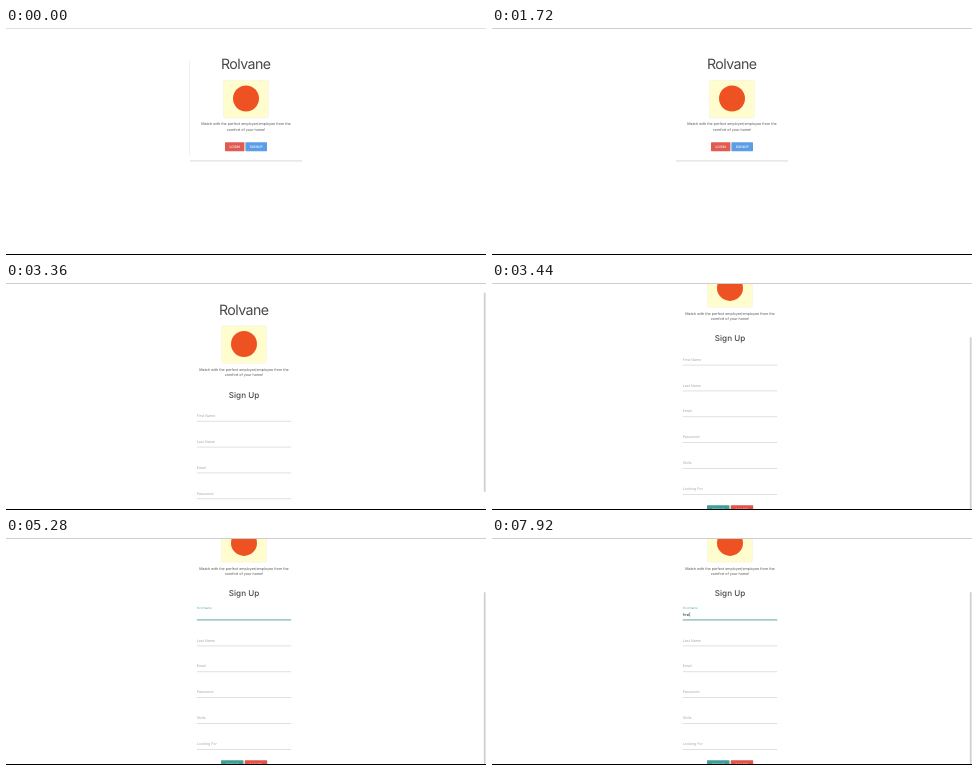
An HTML page that plays this animation: 480 by 227 pixels, repeating every 8000 ms.

```html
<!DOCTYPE html>
<html lang="en">
<head>
<meta charset="utf-8">
<title>Sign up</title>
<style>
  html, body { margin: 0; width: 100%; height: 100%; overflow: hidden; background: #fff; }
  svg { display: block; width: 480px; height: 227px; }
  text { font-family: Inter, sans-serif; font-size: 3.65px; fill: #555; text-rendering: geometricPrecision; }
  .mid { text-anchor: middle; }
  .title { font-size: 14.2px; letter-spacing: -.55px; fill: #484848; }
  .head { font-size: 8.1px; font-weight: 500; fill: #484848; }
  .label { font-size: 3.6px; fill: #a8a8a8; }
  .btn { font-size: 3.4px; font-weight: 500; fill: #fff; }
</style>
</head>
<body>
<svg id="stage" viewBox="0 0 480 227">
  <defs>
    <g id="intro">
      <text class="title mid" x="239.8" y="41">Rolvane</text>
      <rect x="217.4" y="52.3" width="45" height="37.5" rx="1.5" fill="#fffdce" stroke="#eeeee2" stroke-width=".5"/>
      <circle cx="240" cy="70.5" r="13" fill="#ee5122"/>
      <text class="mid" x="240" y="97.3">Match with the perfect employer/employee from the</text>
      <text class="mid" x="240" y="102.6">comfort of your home!</text>
    </g>
  </defs>
  <g id="home">
    <use href="#intro"/>
    <rect id="edge" x="183.2" y="32" width=".6" height="96" fill="#e6e6e6"/>
    <rect x="184" y="132.6" width="112" height=".7" fill="#c8c8c8"/>
  </g>
  <g id="form">
    <use href="#intro" x="-2"/>
    <text class="head mid" x="238" y="124">Sign Up</text>
  </g>
  <rect id="thumb" x="477.8" width="1.8" rx=".9" fill="#d0d0d0"/>
  <rect id="top" width="480" height="1"/>
  <rect y="226" width="480" height="1" fill="#000"/>
</svg>
<script>
const LOOP = 8000;
const $ = id => document.getElementById(id);
const home = $('home'), form = $('form'), thumb = $('thumb');

function add(parent, tag, attrs, text = '') {
  const el = document.createElementNS('http://www.w3.org/2000/svg', tag);
  for (const k in attrs) el.setAttribute(k, attrs[k]);
  el.textContent = text;
  parent.append(el);
  return el;
}

function button(parent, x, y, w, fill, text) {
  add(parent, 'rect', { x, y, width: w, height: 9, rx: .6, fill });
  add(parent, 'text', { class: 'btn mid', x: x + w / 2, y: y + 5.7 }, text);
}

button(home, 219, 114.2, 19.4, '#e25b51', 'LOGIN');
button(home, 239.4, 114.2, 21.6, '#5b9de6', 'SIGNUP');
button(form, 215, 287.8, 22.5, '#3f9f98', 'SIGNUP');
button(form, 238.7, 287.8, 22.5, '#e25349', 'CANCEL');

const labels = ['First Name', 'Last Name', 'Email', 'Password', 'Skills', 'Looking For'].map((name, i) => {
  const y = 143.3 + i * 25.9;
  add(form, 'rect', { x: 190.8, y: y + 4.1, width: 94.4, height: .5, fill: '#c0c0c0' });
  return add(form, 'text', { class: 'label', x: 190.8, y }, name);
});
const focusLine = add(form, 'rect', { x: 190.8, y: 147.1, width: 94.4, height: .8, fill: '#4aada4' });
const typed = add(form, 'text', { x: 190.8, y: 143.3, style: 'fill:#222' });
const caret = add(form, 'rect', { y: 139.8, width: .45, height: 4.4, fill: '#444' });

// [start ms, scroll, thumb top, thumb bottom]
const scrolls = [[3000, 0, 2, 201], [3360, 9.5, 9.5, 209], [3440, 65.6, 54, 226]];
const typing = [[0, ''], [6120, 'f'], [6200, 'fi'], [6480, 'fir'], [6680, 'firs'], [6840, 'first']];
const carets = [[0, 0], [4840, 1], [5280, 0], [5760, 1], [7320, 0], [7920, 1]];
const at = (steps, t) => steps.reduce((cur, s) => t >= s[0] ? s : cur);
const mix = (a, b, p) => a + (b - a) * p;
const show = (el, on) => el.style.display = on ? '' : 'none';

function draw(t) {
  const isForm = t >= 3000;
  show(home, !isForm);
  show(form, isForm);
  show(thumb, isForm);
  show($('edge'), t < 600);
  $('top').setAttribute('fill', t < 560 ? '#e0e0e0' : '#cecece');

  const [, scroll, from, to] = at(scrolls, t);
  form.setAttribute('transform', `translate(0 ${-scroll})`);
  thumb.setAttribute('y', from);
  thumb.setAttribute('height', to - from);

  const p = Math.min(1, Math.max(0, (t - 4820) / 180));
  const ease = 1 - (1 - p) ** 2;
  labels[0].setAttribute('y', mix(143.3, 136.3, ease));
  labels[0].style.fontSize = mix(3.6, 2.9, ease) + 'px';
  labels[0].style.fill = `rgb(${mix(168, 75, ease)},${mix(168, 172, ease)},${mix(168, 163, ease)})`;
  focusLine.setAttribute('opacity', ease);

  const text = at(typing, t)[1];
  if (typed.textContent !== text) typed.textContent = text;
  show(caret, at(carets, t)[1]);
  caret.setAttribute('x', 190.9 + (text && isForm ? typed.getComputedTextLength() : 0));
}

const start = performance.now();
function tick() {
  draw((performance.now() - start) % LOOP);
  requestAnimationFrame(tick);
}
tick();
</script>
</body>
</html>
```
